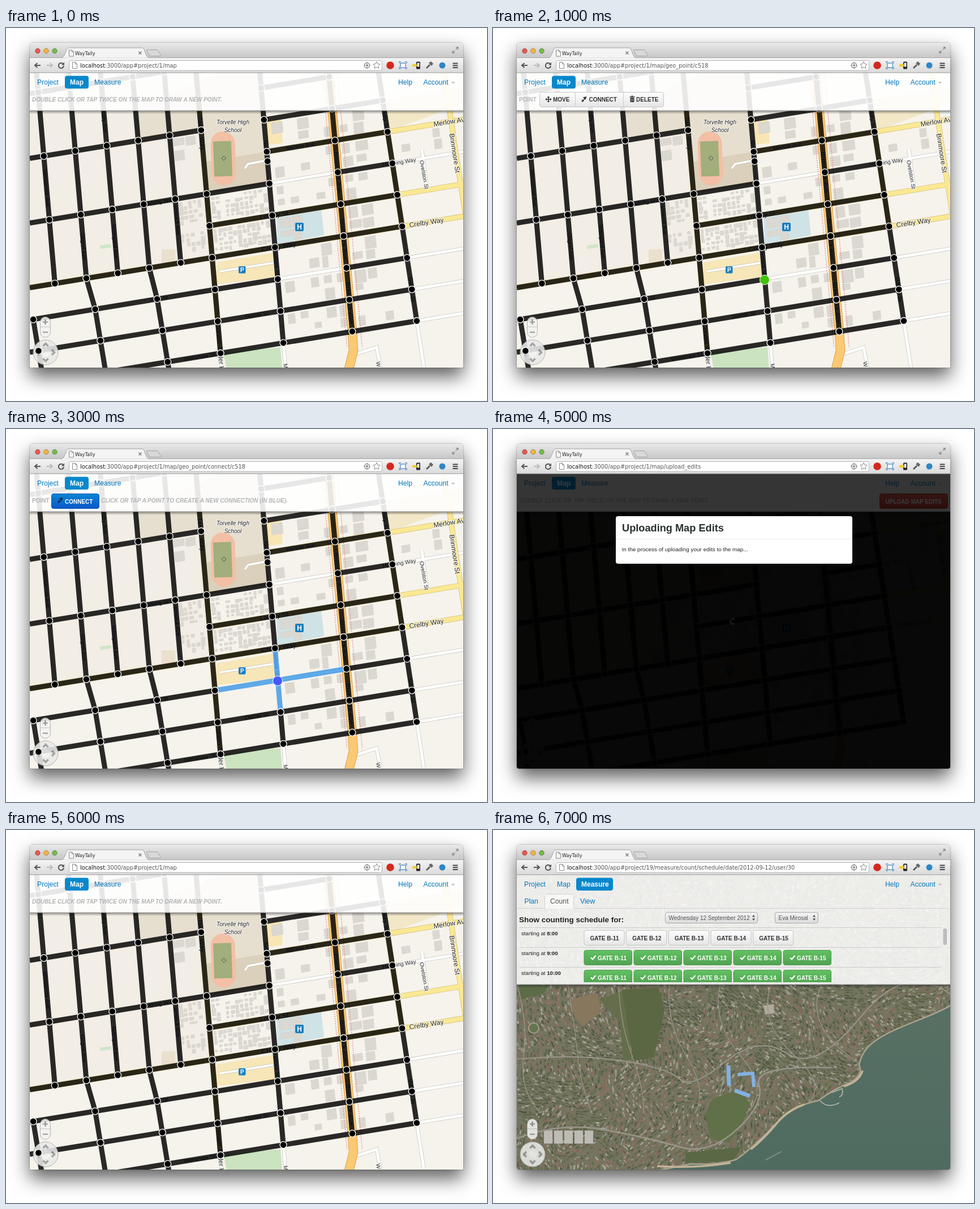
Recreate the animation shown at these times as an HTML page. Size 850 px wide and 659 px high, loop 8000 ms.

```html
<!DOCTYPE html>
<html lang="en">
<head>
<meta charset="utf-8">
<title>Street map walkthrough</title>
<style>
html, body { margin: 0; width: 100%; height: 100%; overflow: hidden; background: #fff; }
.win { position: absolute; left: 42px; top: 26px; width: 766px; height: 574px; border-radius: 5px 5px 2px 2px;
  box-shadow: 0 16px 33px rgba(0,0,0,.63), 0 0 2px rgba(0,0,0,.5); }
svg { position: absolute; left: 0; top: 0; display: block; }
text { font-family: "Liberation Sans", Arial, sans-serif; white-space: pre; }
.ui { font-family: "DejaVu Sans", sans-serif; }
.b { font-weight: bold; }
.i { font-style: italic; }
.m { text-anchor: middle; }
.halo { paint-order: stroke; stroke: #fffc; stroke-width: 2px; }
</style>
</head>
<body>
<div class="win"></div>
<svg id="stage" width="850" height="659" viewBox="0 0 850 659"></svg>
<script>
const STEP = 1000, LOOP = 8000;

let seed = 7;
const rnd = () => (seed = (seed * 16807) % 2147483647) / 2147483647;
const range = n => [...Array(n).keys()];
const each = (n, f) => range(n).map(f).join('');
const fix = n => n.toFixed(1);

const on = (steps, body) => `<g data-on="${steps}">${body}</g>`;
const rect = (x, y, w, h, fill, more = '') => `<rect x="${x}" y="${y}" width="${w}" height="${h}" fill="${fill}" ${more}/>`;
const dot = (x, y, r, fill, more = '') => `<circle cx="${x}" cy="${y}" r="${r}" fill="${fill}" ${more}/>`;
const poly = (pts, fill, more = '') => `<polygon points="${pts}" fill="${fill}" ${more}/>`;
const line = (pts, color, w, more = '') => `<polyline points="${pts}" fill="none" stroke="${color}" stroke-width="${w}" ${more}/>`;
const path = (d, color, w, more = '') => `<path d="${d}" fill="none" stroke="${color}" stroke-width="${w}" ${more}/>`;
const text = (s, x, y, size, fill = '#222', cls = '', more = '') =>
  `<text x="${x}" y="${y}" font-size="${size}" fill="${fill}" class="${cls}" ${more}>${s}</text>`;
const grad = (id, top, bottom) =>
  `<linearGradient id="${id}" x2="0" y2="1"><stop stop-color="${top}"/><stop offset="1" stop-color="${bottom}"/></linearGradient>`;

// ---- street grid: columns a-e, K, N, B, G; "-" and "+" are the window edges ----
const mains = { K: [335, 4.9], N: [446, 4.9], B: [566, 5.1], G: [648.5, 8.6], '-': [42, 0], '+': [810, 0] };

function cross(id, row) {
  const k = 'abcde'.indexOf(id);
  const [x0, lean] = mains[id] || (row > 6 ? [-17 + 109.5 * k, 9.3] : [57 + 55.6 * k, 4.9]);
  const x = x0 + lean * row;
  return [x, rowY(row, x)];
}
const rowY = (row, x) => 123 + 57.1 * row - .1645 * x;
const at = token => cross(token[0], +token.slice(1));
const pts = tokens => tokens.split(' ').map(t => at(t).map(fix).join()).join(' ');

const across = ['-0 e0', 'N1 B1', '-2 K2', 'N2 G2', 'N3 G3', '-4 N4', 'B4 G4', 'K5 G5', '-6 G6', '-7 K7', 'B7 G7', '-8 G8', 'b9 G9'];
const down = ['a-1 a6', 'b-1 b6 b7 b10', 'c-1 c6', 'd-1 d6 c7 c10', 'e-1 e6', 'a7 a10', 'K-1 K9', 'N0 N6', 'N8 N9', 'B0 B9', 'G1 G9'];
const hub = ['K7 N7', 'N6 N8'], added = 'N7 B7';

function nodes() {
  const tokens = new Set(['N7', 'N3.3']);
  for (const span of across) {
    const [from, to] = span.split(' '), row = +to.slice(1);
    const ids = row > 6 ? 'abcKNBG' : 'abcdeKNBG';
    const start = Math.max(0, ids.indexOf(from[0]));
    for (const id of ids.slice(start, ids.indexOf(to[0]) + 1)) tokens.add(id + row);
  }
  return [...tokens].map(at).filter(([x, y]) => x > 45 && y < 597)
    .map(([x, y]) => dot(fix(x), fix(y), 6, '#000', 'stroke="#fff" stroke-width="1.3"')).join('');
}

// Buildings scattered over part of one block
function block(from, to, row, u0, u1, size, keep) {
  let d = '';
  const gap = size * 1.2, width = cross(to, row)[0] - cross(from, row)[0];
  for (let down = 8; down < 50 - size / 2; down += gap)
    for (let u = u0 * width; u < u1 * width - size / 2; u += gap) {
      if (rnd() > keep) continue;
      const r = row + down / 57.1, x = cross(from, r)[0] + u, w = size * (.5 + rnd() * .6), h = size * (.5 + rnd() * .6);
      d += `M${fix(x)} ${fix(rowY(r, x))}l${fix(w)} ${fix(-w * .17)}l${fix(h * .1)} ${fix(h)}l${fix(-w)} ${fix(w * .17)}z`;
    }
  return `<path d="${d}" fill="#dbd8d1" stroke="#cfccc4" stroke-width=".5"/>`;
}

const cased = (list, edge, fill, w) => list.map(p => line(p, edge, w + 1.6)).join('') + list.map(p => line(p, fill, w)).join('');

const label = (s, x, y, turn, size = 10) =>
  text(s, fix(x), fix(y), size, '#222', 'm halo', `transform="rotate(${turn} ${fix(x)} ${fix(y)})" dy="${size * .35}"`);
const rowLabel = (s, x, row, size) => label(s, x, rowY(row, x), -9, size);
const colLabel = (s, token, size) => label(s, ...at(token), 85, size);
const sign = (s, x, y, w) => rect(x, y, w, w, '#1b7fbd', 'rx="2"') + text(s, x + w / 2, y + w * .8, w * .8, '#fff', 'b m');

function ground() {
  return rect(42, 79, 766, 521, '#f6f3ec') + poly('42,79 340,79 364,405 42,460', '#f2ede5') +
    poly(pts('d1 N0 N4 K4 K2 d2'), '#e6dfcf') + poly(pts('K3 N3 N4 K4'), '#dad0bb') +
    poly(pts('G2 +2 +2.5 G3'), '#f2e8c8') + poly('460,166 486,162 489,203 463,207', '#f8e6b4') +
    poly('478,334 557,320 562,366 480,382', '#cfe2e6') + poly('372,414 471,397 476,440 372,453', '#f6e6b8') +
    poly('384,573 485,564 488,602 390,602', '#cbe3bf') + rect(166, 383, 20, 6, '#cfe5c8', 'transform="rotate(-8 176 386)"') +
    rect(275, 391, 24, 27, '#eae0cd') +
    rect(362.5, 183, 43, 95, '#f3bfa5', 'rx="21" transform="rotate(-2 384 230)"') +
    rect(367, 200, 32, 62, '#a2ae7b', 'transform="rotate(-2 384 230)"') + poly('385,226 389,230 385,234 381,230', 'none', 'stroke="#555"') +
    cased(['378,430 472,415', '422,248 428,240 460,234'], '#c9c5ba', '#fff', 3.5);
}

function buildings() {
  let s = block('e', 'K', 2, .1, .8, 18, .5) + block('G', '+', 3, .15, .9, 16, .25);
  for (const row of [4, 5]) s += block('e', 'K', row, .1, .9, 7, .7) + block('K', 'N', row, .06, .95, 7, .8);
  for (const row of range(7)) s += block('N', 'B', row + 2, .1, .95, 19, .5) + block('B', 'G', row + 2, .12, .65, 20, .7);
  return s;
}

function roads() {
  const minor = ['N4 B4', added, 'G4 +4', 'G7 +7', 'G8 +8', 'G9 +9', 'G9 G11', 'K9 K10', 'N9 N10'].map(pts);
  const yellow = [...['G3 +3', 'G5 +5', 'G6 +6'].map(pts), '774,79 797,235 812,330'];
  const olive = ['K-1 K9', '-6 G6', 'K5 G5', 'N3 G3', 'G3 G6'].map(pts);
  const dashes = x => line(pts('B0 B9.5'), '#e08c8c', 1.3, `stroke-dasharray="2 2" transform="translate(${x} 0)"`);
  return cased([...minor, '612,578 655,564 662,602', '735,215 745,290'], '#c8c8c4', '#fff', 5) +
    cased(yellow, '#d5c27b', '#fbe894', 8) + cased(olive, '#d9c57e', '#f9e592', 8) +
    cased([pts('B0 B9') + ' 614,570 606,602'], '#d39b45', '#fbc873', 15) + dashes(-12) + dashes(15);
}

function labels() {
  return text('Torvelle High', 401, 170, 10, '#222', 'm i halo') + text('School', 401, 183.5, 10, '#222', 'm i halo') +
    rowLabel('Merlow Ave', 520, 3) + rowLabel('Merlow Ave', 786, 3, 12) + rowLabel('Haldring Way', 268, 4) + rowLabel('Haldring Way', 695, 4) +
    rowLabel('Lomby St', 474, 5, 12) + rowLabel('Crelby Way', 482, 6, 12) + rowLabel('Crelby Way', 743, 6, 12) +
    rowLabel('Tolm St', 270, 7) + rowLabel('Dornel St', 443, 8) + rowLabel('Wenshaw St', 342, 9) +
    ['B4', 'B6.1', 'B8.1'].map(t => colLabel('Brennock Ave', t, 12)).join('') +
    colLabel('Talder Way', 'K2.1', 12) + colLabel('Corwin Talder K', 'K8.8', 12) + colLabel('Wilmarrow Ave', 'a3') +
    colLabel('Osgrel Ave', 'b5') + colLabel('Orsby Ave', 'c1.2') + colLabel('Tellingard Ave', 'c5') + colLabel('Farnwick Ave', 'e4.6') +
    colLabel('Nelora', 'N2.9') + colLabel('Nelora St', 'N6.5') + colLabel('Galvey St', 'G2.5') + colLabel('Galvey St', 'G8') +
    label('Ovelston St', 739, 259, 80) + label('Brinmoore St', 793, 221, 81, 12) + label('W', 658, 594, 82) + label('M', 494, 597, 85) +
    sign('H', 511, 344, 15) + sign('P', 411, 421, 12.5);
}

function streets() {
  const ink = p => line(pts(p), '#000', 9), blue = p => line(pts(p), '#3f9ae6', 9);
  const pick = color => dot(480, 445, 8.5, color, 'stroke="#fff" stroke-width="1"');
  return ground() + buildings() + roads() + labels() +
    `<g opacity=".83">${[...across, ...down].map(ink).join('')}${on('0 1 4 5 6', hub.map(ink).join(''))}${on('4 5 6', ink(added))}
      ${on('2 3', hub.map(blue).join(''))}${on('3', blue(added))}</g>` +
    controls() + nodes() + on('1 4', pick('#3fc407')) + on('2 3', pick('#4757fb'));
}

// ---- aerial view: rows of roofs and trees, turned and tinted by district ----
function town() {
  const tones = ['#9c7263', '#8a6657', '#aaa598', '#bdb9ae', '#56623f', '#454f3b', '#7a7c60'];
  const d = tones.map(() => '');
  const hash = (a, b) => Math.abs(Math.sin(a * 12.9 + b * 78.2) * 43758.5) % 1;
  for (let y = 80; y < 600; y += 5)
    for (let x = 43; x < 806; x += 6) {
      const zone = hash(Math.floor((x + y * .3) / 58), Math.floor((y - x * .2) / 46));
      const r = rnd(), pick = r < .3 ? 0 : r < .5 ? 2 : r < .85 ? 4 : 6;
      const tone = pick === 6 ? 6 : (zone < .25 && pick === 0 ? 4 : pick) + (rnd() < .4 ? 1 : 0);
      const a = zone * 3, w = 3 + rnd() * 5, h = 1.4 + rnd() * 1.8, c = Math.cos(a), s = Math.sin(a);
      d[tone] += `M${fix(x + rnd() * 3)} ${fix(y + rnd() * 3)}l${fix(w * c)} ${fix(w * s)}l${fix(-h * s)} ${fix(h * c)}l${fix(-w * c)} ${fix(-w * s)}z`;
    }
  return `<g opacity=".75">${tones.map((c, k) => `<path d="${d[k]}" fill="${c}"/>`).join('')}</g>`;
}

function aerial() {
  const coast = 'M810 309C780 328 735 340 700 358S652 390 647 415Q655 432 632 446Q605 456 575 478Q530 488 510 508Q490 530 474 545Q450 568 430 582Q400 592 350 590L290 602';
  const lanes = each(7, n => path(`M${42 + n * 90} 270q${20 - n * 9} 70 ${12 + n * 6} 130t${30 - n * 5} 100`, '#99958a', 1.3));
  return rect(42, 79, 766, 521, '#73735f') + town() +
    poly('134,300 184,288 192,322 158,346 146,334', '#87775d') + poly('188,300 238,280 244,405 230,408 224,340', '#656e4c') +
    poly('228,282 292,278 303,318 284,402 248,408', '#5b6642') + poly('42,274 100,274 90,288 50,300', '#5d6c48') +
    poly('390,474 430,460 455,482 440,520 418,552 384,546 376,500', '#607048') + poly('340,570 440,560 424,584 340,588', '#5a6845') +
    poly('478,310 496,308 497,324 481,326', '#b0aa9c') + each(5, n => rect(90 + n * 18, 531, 15, 23, '#bdbbb4')) + lanes +
    path('M42 405Q150 395 230 408T330 440T410 410T520 395T650 330T808 290', '#99958a', 2) +
    path('M42 545Q120 515 200 530T330 560T430 530T470 450T600 420', '#99958a', 2.5) + dot(72, 350, 9, '#66754f', 'stroke="#a29d8c" stroke-width="2"') +
    `<path d="${coast}L810 602Z" fill="url(#sea)"/>` + path(coast, '#aba28c', 2.5) +
    path('M653 425Q648 444 620 453M550 485Q520 495 500 520Q478 546 456 564M420 588Q360 598 290 594', '#c2b398', 3.5) +
    path('M578 478Q590 493 612 482M598 464L617 457Q620 468 612 472', '#aeb3a6', 1.8) + path('M482 583L510 568', '#809a8c', 1.5) +
    line('416,416 417,452', '#82b0e2', 7) + line('432,432 459,430 461,454', '#82b0e2', 6) + line('427,460 454,470', '#82b0e2', 7);
}

function controls() {
  const arrow = t => `<path d="M64 561l6-6l6 6l-3 2l-3-3l-3 3z" fill="#999" transform="rotate(${t * 90} 70 573)"/>`;
  return `<g opacity=".88">${rect(60.5, 510.5, 18, 36, '#f2f2f2', 'rx="9" stroke="#aaa"')}${line('61,528 78,528', '#bbb', 1)}
    ${path('M65 519.5h9M69.5 515v9M65 537.5h9', '#888', 2.2)}${dot(70, 573, 22, '#e9e9e9', 'stroke="#aaa"')}
    ${each(4, arrow)}${dot(70, 573, 8, '#f2f2f2')}</g>`;
}

// ---- page header ----
const button = (x, y, w, fill, edge) => rect(x + .5, y + .5, w - 1, 26, `url(#${fill})`, `rx="3.5" stroke="${edge}"`);
const link = (s, x, y = 100) => text(s, x, y, 12.2, '#0077bb');
const pill = (s, x, w) => rect(x, 84.5, w, 22.5, '#0788cc', 'rx="4"') + text(s, x + 9, 100, 12, '#fff', 'b');
const caps = (s, x, y = 130, fill = '#333', cls = 'b') => text(s, x, y, 10, fill, cls);
const hint = (s, x) => caps(s, x, 130, '#b4b4b4', 'b i');
const linkIcon = (x, fill) => path(`M${x - 4} 130l8-8`, fill, 1.6) + poly(`${x - 2},122.5 ${x + 4},121 ${x + 2.5},127`, fill) + poly(`${x - 4},126 ${x},129 ${x - 4},131`, fill);

function nav() {
  return link('Project', 55) + on('0 1 2 3 4 5 6', pill('Map', 104, 42) + link('Measure', 156)) +
    on('7', link('Map', 113) + pill('Measure', 147, 65)) + link('Help', 693) + link('Account', 737.5) + poly('787,95 793,95 790,98.5', '#bbb');
}

function pointTools() {
  const tip = t => poly('95.5,123 98,120.5 100.5,123', '#333', `transform="rotate(${t * 90} 98 126)"`);
  return caps('POINT', 46, 130, '#b4b4b4') + button(82, 113, 220, 'plain', '#c6c6c6') + path('M145.5 114v25M230.5 114v25', '#ccc', 1) +
    path('M94 126h8M98 122v8', '#333', 1.5) + each(4, tip) + caps('MOVE', 106) + linkIcon(161, '#333') + caps('CONNECT', 169.5) +
    rect(242.5, 123, 7, 8, '#333', 'rx="1"') + rect(241.5, 121, 9, 1.3, '#333') + rect(244.5, 119.6, 3, 1.4, '#333') +
    path('M244.7 124.5v5M247.3 124.5v5', '#ddd', .8) + caps('DELETE', 253);
}

function scheduleRow(n) {
  const y = 173 + n * 35;
  const gate = k => {
    const name = 'GATE B-' + (11 + k), x = 160.5 + k * (n ? 88 : 74.7);
    return n ? button(x, y + 4, 85.5, 'green', '#4b9a4b') + path(`M${x + 12.5} ${y + 17.5}l3 3l5.5-6.5`, '#fff', 2.2) + caps(name, x + 24.5, y + 21.5, '#fff')
      : button(x, y + 4, 72, 'plain', '#c4c4c4') + caps(name, x + 11, y + 21.5);
  };
  return text(`starting at <tspan class="b">${8 + n}:00</tspan>`, 50, y + 13, 9.7) + line(`47,${y + 34.5} 792,${y + 34.5}`, '#ccc', 1) + each(5, gate);
}

function schedule() {
  const select = (s, x, w) => rect(x + .5, 145.5, w - 1, 19, 'url(#pick)', 'rx="3.5" stroke="#aaa"') + text(s, x + 6.5, 158.5, 10, '#555') +
    `<path d="M${x + w - 10} 153.5h5l-2.5-3.5zm0 3h5l-2.5 3.5z" fill="#444"/>`;
  return line('42,138.5 91.5,138.5 91.5,117 95,113.5 139,113.5 142.5,117 142.5,138.5 808,138.5', '#d2d2d2', 1) + rect(92, 114, 50, 25, '#fff9', 'rx="3"') +
    link('Plan', 55.5, 130) + text('Count', 101, 130, 12.2, '#555') + link('View', 154, 130) +
    text('Show counting schedule for:', 46, 163, 13.5, '#222', 'b') + select('Wednesday 12 September 2012', 304, 164) + select('Eva Mirosal', 498, 77) +
    line('47,172.5 792,172.5', '#ccc', 1) + `<g clip-path="url(#rows)">${each(3, scheduleRow)}</g>` + rect(795.5, 174, 6.5, 29, '#bcbcbc', 'rx="3"');
}

function header() {
  const sheet = (h, a) => rect(42, 79, 766, h, '#fff', `opacity="${a}"`) + rect(42, 79 + h, 766, 6, 'url(#fall)') + rect(42, 78.5 + h, 766, 1, '#999');
  return on('0 1 2 3 4 5 6', sheet(67, .89)) + on('7', sheet(194, .87)) + nav() +
    on('0 5 6', hint('DOUBLE CLICK OR TAP TWICE ON THE MAP TO DRAW A NEW POINT.', 46)) + on('1 4', pointTools()) +
    on('2 3', caps('POINT', 46, 130, '#b4b4b4') + button(80, 114, 85, 'blue', '#0a55b5') + linkIcon(96, '#123') + caps('CONNECT', 104, 131.5, '#fff') +
      hint('CLICK OR TAP A POINT TO CREATE A NEW CONNECTION (IN BLUE).', 168)) +
    on('4 5', button(683, 114, 121, 'red', '#b0382f') + caps('UPLOAD MAP EDITS', 693.5, 131.5, '#fff')) + on('7', schedule());
}

// ---- browser frame ----
const arrow = (x, dir, color) => path(`M${x - 5 * dir} 66h${10 * dir}m${-4.5 * dir} -4l${4.5 * dir} 4l${-4.5 * dir} 4`, color, 2);
const url = s => text(`localhost<tspan fill="#555">:3000/app#project/${s}</tspan>`, 131, 69.5, 9.8, '#111', 'ui');
const sheetIcon = (x, y) => path(`M${x} ${y}h5l3 3v8h-8zM${x + 5} ${y}v3h3`, '#888', 1);

function star(x, y, r) {
  const tip = k => [x + Math.sin(k * Math.PI / 5) * r * (k % 2 ? .5 : 1), y - Math.cos(k * Math.PI / 5) * r * (k % 2 ? .5 : 1)].map(fix).join();
  return poly(range(10).map(tip).join(' '), '#fff', 'stroke="#888"');
}

function tabs() {
  const lights = ['#e9574e', '#f2b43d', '#74bb46'].map((c, k) => dot(56 + k * 15, 40.5, 4.4, c, 'stroke="#0005" stroke-width=".8"')).join('');
  return rect(42, 26, 766, 27, 'url(#bar)') + rect(42, 53, 766, 26, 'url(#tools)') + line('42,52.5 808,52.5', '#a9a9a9', 1) + lights +
    `<path d="M98 53Q102 52 104 46L107 38Q108 35 111 35H240Q243 35 244 38L247 46Q249 52 253 53Z" fill="#f4f4f4" stroke="#a5a5a5"/>` + rect(99, 52.5, 153, 2, '#f4f4f4') +
    sheetIcon(111.5, 39) + text('WayTally', 122, 47.5, 8.2, '#222', 'ui') + path('M234.5 41.5l5 5m0-5l-5 5', '#777', 1.3) +
    `<path d="M250 38.5h16q2 0 3 2l4 7q1 2-1 2h-15q-3 0-4-2l-4-7q-1-2 1-2z" fill="#d8d8d8" stroke="#a5a5a5"/>` +
    path('M795 38l4-4m-3.5 0h3.5v3.5M793 40l-4 4m0-3.5v3.5h3.5', '#888', 1.3);
}

function tools() {
  return arrow(56, -1, '#555') + on('0 1 2 3 4 5 6', arrow(77, 1, '#bbb')) + on('7', arrow(77, 1, '#555')) +
    path('M101 63.5A4.6 4.6 0 1 0 102 67', '#555', 2) + poly('103,60.5 103,65.5 98,65.5', '#555') +
    rect(111.5, 57.5, 553, 17.5, '#fff', 'rx="3" stroke="#b5b5b5"') + sheetIcon(117.5, 60.5) +
    on('0 6', url('1/map')) + on('1 4', url('1/map/geo_point/c518')) + on('2 3', url('1/map/geo_point/connect/c518')) +
    on('5', url('1/map/upload_edits')) + on('7', url('19/measure/count/schedule/date/2012-09-12/user/30')) +
    dot(638, 66, 4.5, 'none', 'stroke="#888" stroke-width="1.3"') + dot(638, 66, 2, '#888') + path('M638 60v3M638 69v3M632 66h3M641 66h3', '#888', 1) +
    star(655, 66, 6.5) + dot(679, 66, 6.8, '#d4281e') + rect(697, 62, 9, 8, '#fff', 'stroke="#4f87c7" stroke-width="1.3"') +
    path('M695 62v-2.5h3M705 59.5h3v3M695 69v3h3M705 72h3v-3', '#4f87c7', 1.2) +
    rect(725, 59.5, 7, 13, '#222', 'rx="1.5"') + rect(726.5, 61.5, 4, 7, '#eee') + poly('718,64 723,64 723,62 727,66 723,70 723,68 718,68', '#f0cc28') +
    path('M743 71l6-6', '#555', 2.6) + poly('747,62 751,59 755,63 752,67', '#666') + dot(771, 66, 5.5, '#2f86c6') +
    path('M789.5 62.5h9m-9 3.8h9m-9 3.7h9', '#444', 2) + line('42,79 808,79', '#999', 1);
}

const defs = `<defs>${grad('bar', '#e9e9e9', '#c6c6c6')}${grad('tools', '#f4f4f4', '#dadada')}${grad('plain', '#fdfdfd', '#e5e5e5')}${grad('pick', '#f3f3f3', '#dcdcdc')}
  ${grad('blue', '#0a84d4', '#0a58c8')}${grad('red', '#dd5850', '#bf3b33')}${grad('green', '#62c162', '#51a251')}${grad('sea', '#587064', '#4f6b60')}${grad('fall', '#0006', '#0000')}
  <clipPath id="win"><rect x="42" y="26" width="766" height="574" rx="4"/></clipPath><clipPath id="rows"><rect x="42" y="173" width="766" height="96"/></clipPath></defs>`;

const busy = rect(42, 79, 766, 521, '#000', 'opacity=".86"') + path('M427 336.5A4.5 4.5 0 1 0 426 344', '#aaa', 1.5);
const modal = rect(42, 79, 766, 521, '#000', 'opacity=".77"') + rect(217, 154, 418, 84, '#fff', 'rx="4"') +
  text('Uploading Map Edits', 228, 181, 18.2, '#2b3030', 'b') + line('217,194.5 635,194.5', '#e8e8e8', 1) +
  text('In the process of uploading your edits to the map...', 227.5, 216, 9.95);
const status = rect(42, 587, 256, 13, '#e9e9e9', 'stroke="#bbb"') + text('localhost:3000/app#project/1/map/geo_point/c518', 45.5, 596.3, 8.25, '#222', 'ui');

const stage = document.getElementById('stage');
stage.innerHTML = defs + `<g clip-path="url(#win)">${on('0 1 2 3 4 5 6', streets())}${on('7', aerial() + controls())}${on('5', busy)}
  ${header()}${on('5', modal)}${on('4', status)}${tabs()}${tools()}</g>`;

const layers = [...stage.querySelectorAll('[data-on]')].map(el => ({ el, steps: el.dataset.on.split(' ').map(Number) }));
let shown = -1;
function tick() {
  const step = Math.floor(performance.now() % LOOP / STEP);
  if (step !== shown) {
    shown = step;
    for (const { el, steps } of layers) el.style.display = steps.includes(step) ? '' : 'none';
  }
  requestAnimationFrame(tick);
}
tick();
</script>
</body>
</html>
```
